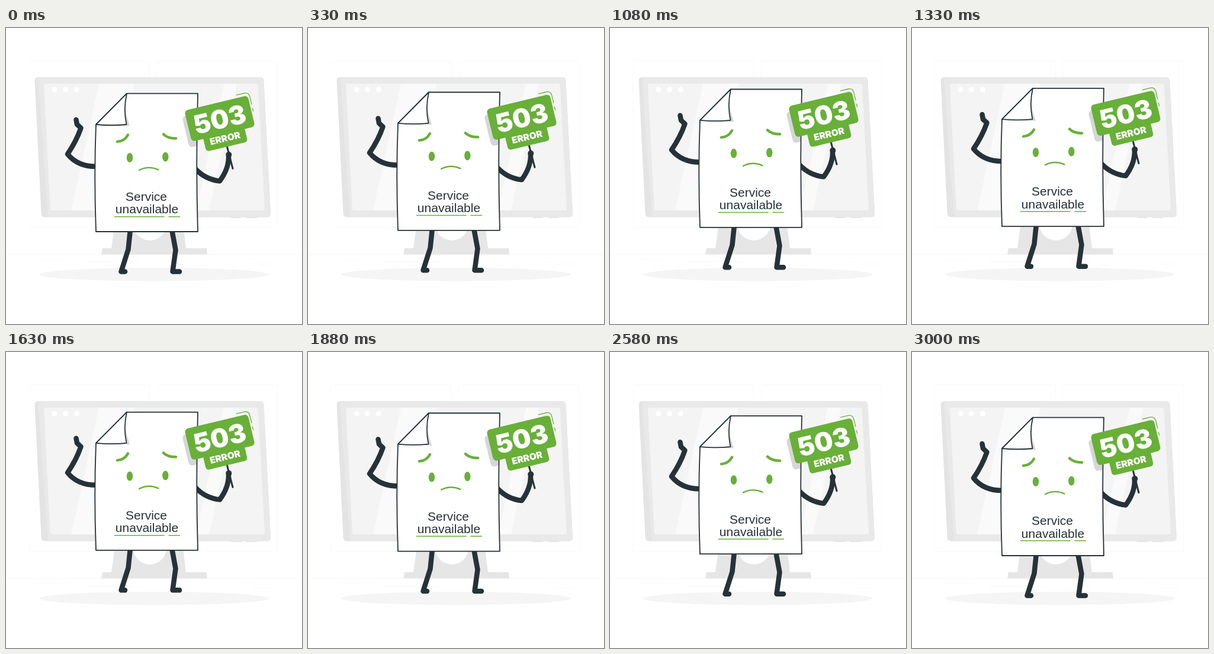
Animation, 500 px wide and 500 px high, one loop 3.04 s. Source, as an HTML page:

```html
<!DOCTYPE html>
<html lang="en">
<head>
<meta charset="utf-8">
<title>503 error</title>
<style>
html, body { margin: 0; width: 100%; height: 100%; overflow: hidden; background: #fff; }
svg { display: block; width: 100%; height: 100%; }
text { text-anchor: middle; }
.line { fill: none; stroke-linecap: round; stroke-linejoin: round; }
.ink { stroke: #263238; }
.green { stroke: #68b038; }
.limb { stroke-width: 8.5; }
.note { font: 21px "Liberation Sans", Arial, sans-serif; fill: #263238; }
.bold { font-family: Inter, sans-serif; font-weight: 900; fill: #fff; }
</style>
</head>
<body>
<svg viewBox="0 0 500 500">
  <defs>
    <path id="sheet" d="M204 110.7H324Q320.5 230 324 344H152Q148.5 250 152 163Z"/>
    <clipPath id="onSheet"><use href="#sheet"/></clipPath>
    <rect id="board" x="-55" y="-27" width="110" height="54" rx="6"/>
  </defs>

  <!-- Wall and floor -->
  <g fill="none" stroke="#ebebeb" stroke-width=".3">
    <rect x="39" y="55" width="203.500" height="282.500" rx="3"/>
    <rect x="255" y="55" width="203.500" height="282.500" rx="3"/>
    <path d="M0 382.400H500M417 398.600h33M322 401.300h9M397 389.300h19M52 391h43M104 391h7M131 395.200h94"/>
  </g>
  <ellipse cx="250" cy="416.200" rx="193.900" ry="11.300" fill="#f5f5f5"/>

  <!-- Monitor -->
  <path fill="#e6e6e6" d="M186 315H297L304 372H339L340 382.500H161L163 372H178Z"/>
  <circle cx="243" cy="331" r="28" fill="#fff"/>
  <path fill="#e4e4e4" d="M55 83H429Q435 83 435.500 89L447 313Q447 319.500 441 319.500H66Q60 319.500 59.500 313L48.500 89Q48.500 83 55 83ZM380 319h17v2h-17ZM406 319h18v2h-18Z"/>
  <path fill="#e9e9e9" d="M60 83H429Q435 83 435.500 89L447 313Q447 319.500 441 319.500H77Q71 319.500 70.500 313L54.500 89Q54.500 83 60 83Z"/>
  <path fill="#f4f4f4" d="M67 94H422Q425.500 94 425.700 97L437 305Q437 308 434 308H78Q75 308 74.800 305L64 97Q64 94 67 94Z"/>
  <path fill="#fafafa" d="M157 94h60l-47 214h-60ZM368 94h22l-47 214h-22Z"/>
  <g fill="#fff">
    <circle cx="82" cy="104" r="4.500"/>
    <circle cx="100.500" cy="104" r="4.500"/>
    <circle cx="119.500" cy="104" r="4.500"/>
  </g>

  <g id="hero">
    <path class="line ink limb" d="M118.500 155L120 163L126.500 169Q119 191 104 213Q121 234 152 234
      M320 238Q337 256 361 258.500Q377 237 376 215
      M210 340L206.500 374L194.500 411.500H201M280 340L286.500 375L281.500 411.500H293"/>

    <use href="#sheet" fill="#fff"/>
    <path fill="#d6d6d6" d="M202 142L209 165.500L168 164Z"/>
    <use href="#board" clip-path="none" opacity="0"/>
    <g clip-path="url(#onSheet)">
      <use href="#board" fill="#d6d6d6" transform="translate(357 163) rotate(-13.500)"/>
    </g>
    <use href="#sheet" class="line ink" stroke-width="1.800"/>
    <path class="line ink" style="fill:#fff" stroke-width="1.800" d="M204 110.700L152 163Q178 165.500 203.500 163Q198 137 204 110.700Z"/>

    <!-- Face -->
    <g class="line green">
      <path stroke-width="4.500" d="M188 192Q200 191.500 206 180.500M266 179.500Q273 186.500 287 186.500"/>
      <path stroke-width="2.400" d="M225 240.200Q241 232 257.500 239.500"/>
      <path stroke-width="1.500" d="M183.500 318.800H267M275 318.800H293.500"/>
    </g>
    <g fill="#68b038">
      <ellipse cx="209" cy="219" rx="5.200" ry="8"/>
      <ellipse cx="269.300" cy="217.700" rx="5.200" ry="8"/>
    </g>
    <text class="note" x="237" y="292.300">Service</text>
    <text class="note" x="238" y="313.500">unavailable</text>

    <!-- Sign -->
    <path class="line ink" stroke-width="3" d="M372 195L383 237.500"/>
    <circle cx="376.300" cy="214" r="5" fill="#263238"/>
    <g transform="translate(361 153) rotate(-13.500)" fill="#68b038">
      <use href="#board"/>
      <rect x="-35" y="22" width="72" height="27" rx="5"/>
      <path class="line green" style="fill:none" stroke-width="1.300" d="M37-32H50Q58-32 58-24V-11M58-4V1"/>
      <text class="bold" font-size="44" y="17">503</text>
      <text class="bold" font-size="15.500" x="1" y="40">ERROR</text>
    </g>
  </g>
</svg>
<script>
const LOOP = 3040, HALF = 1500, RISE = 10;
const hero = document.getElementById("hero");

// Steady rise and fall, with a short rest at the bottom
function draw(now) {
  const t = now % LOOP;
  const lift = RISE * Math.max(0, 1 - Math.abs(t / HALF - 1));
  hero.setAttribute("transform", `translate(0 ${-lift})`);
  requestAnimationFrame(draw);
}
draw(performance.now());
</script>
</body>
</html>
```
